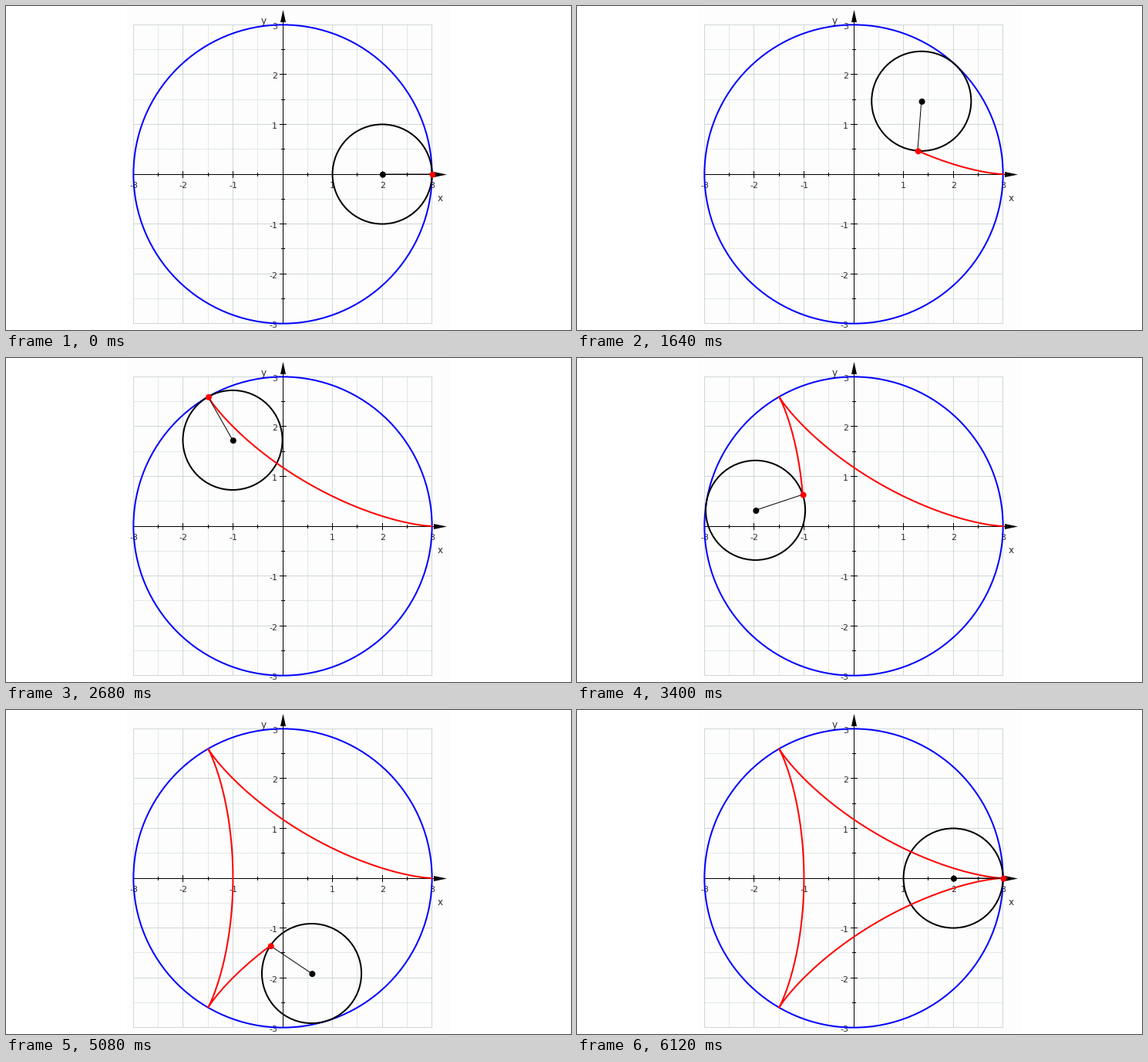
A matplotlib script for the animation above (8120 ms loop, 733 px wide and 420 px high).

```python
import numpy as np
import matplotlib.pyplot as plt
from matplotlib.animation import FuncAnimation
from matplotlib.patches import Circle, Polygon, Rectangle

W, H, DPI = 733, 420, 100
PT = 72 / DPI                      # points per pixel
CX, CY, UNIT = 359.0, 218.0, 64.55
AX, AY = 359.5, 218.5              # pixel centres of the two axes
DOT_DX, DOT_DY = 0.8, 0.6
TICK_MS, LOOP_MS = 40, 8120
HOLD_MS, STEP_MS, STEPS = 1000, 80, 65

plt.rcParams["font.family"] = "DejaVu Sans"
fig = plt.figure(figsize=(W / DPI, H / DPI), dpi=DPI, facecolor="white")
ax = fig.add_axes([0, 0, 1, 1])
ax.set_xlim(0, W)
ax.set_ylim(H, 0)
ax.axis("off")


def to_px(x, y):
    return CX + UNIT * np.asarray(x), CY - UNIT * np.asarray(y)


def crisp(x, y):
    """Centre of the pixel that holds the point."""
    px, py = to_px(x, y)
    return np.floor(px) + 0.5, np.floor(py) + 0.5


def line(xs, ys, color="black", width=1, z=3, **kw):
    return ax.plot(xs, ys, color=color, lw=width * PT, zorder=z,
                   snap=False, **kw)[0]


def label(x, base, text, size=11, ha="center"):
    ax.text(x, base, text, fontsize=size * PT, color="#2a2a2a", ha=ha,
            va="baseline", zorder=4)


def ring(radius, color, z):
    return ax.add_patch(Circle((CX, CY), radius * UNIT, fill=False,
                               ec=color, lw=2 * PT, zorder=z))


def dot(color, z):
    return ax.add_patch(Circle((CX, CY), 4, fc=color, ec="none", zorder=z))


def draw_grid():
    ax.add_patch(Rectangle((157, 0), 419, H, fc="#fdfdfd", ec="none",
                           zorder=0))
    left, top = crisp(-3, 3)
    right, bottom = crisp(3, -3)
    for i in range(-6, 7):
        x, y = crisp(i / 2, i / 2)
        color, z = ("#cfd6d6", 2) if i % 2 == 0 else ("#e3e8e8", 1)
        line([x, x], [top, bottom], color, z=z)
        line([left, right], [y, y], color, z=z)


def draw_axes():
    line([crisp(-3, 0)[0], 560], [AY, AY])
    line([AX, AX], [crisp(0, -3)[1], 15])
    for head in ([(572, AY), (555, AY - 3.5), (555, AY + 3.5)],
                 [(AX, 5), (AX - 3.5, 21), (AX + 3.5, 21)]):
        ax.add_patch(Polygon(head, fc="black", ec="none", zorder=3))
    for i in range(-6, 7):
        if i == 0:
            continue
        x, y = crisp(i / 2, i / 2)
        half = 4 if i % 2 == 0 else 2
        line([x, x], [AY - half, AY + half])
        line([AX - half, AX + half], [y, y])
        if i % 2 == 0:
            label(x, 236, str(i // 2))
            label(352, y + 5.5, str(i // 2), ha="right")
    label(563.5, 253, "x", 12)
    label(334.5, 23, "y", 12)


draw_grid()
draw_axes()
ring(3, "blue", 5)
wheel = ring(1, "black", 6)
trace = line([], [], "red", 2, 7, solid_joinstyle="round")
arm = line([], [], "black", 1, 8)
hub = dot("black", 9)
pen = dot("red", 10)


def roll_angle(ms):
    """Angle of the wheel's centre, held between the steps."""
    if ms < HOLD_MS:
        return 0.0
    step = min(1 + (ms - HOLD_MS) // STEP_MS, STEPS)
    deg = np.interp(step, [1, 31, 43, STEPS], [2.2, 170.8, 236.3, 360])
    return np.radians(deg)


def deltoid(t):
    return to_px(2 * np.cos(t) + np.cos(2 * t), 2 * np.sin(t) - np.sin(2 * t))


def update(i):
    t = roll_angle(i * TICK_MS)
    hx, hy = to_px(2 * np.cos(t), 2 * np.sin(t))
    px, py = deltoid(t)
    wheel.center = (hx, hy)
    hub.center = (hx + DOT_DX, hy + DOT_DY)
    pen.center = (px + DOT_DX, py + DOT_DY)
    arm.set_data([hx, px], [hy, py])
    trace.set_data(*deltoid(np.linspace(0, t, 240)))
    return wheel, trace, arm, hub, pen


anim = FuncAnimation(fig, update, frames=LOOP_MS // TICK_MS,
                     interval=TICK_MS, repeat=True, repeat_delay=0)
plt.show()
```
